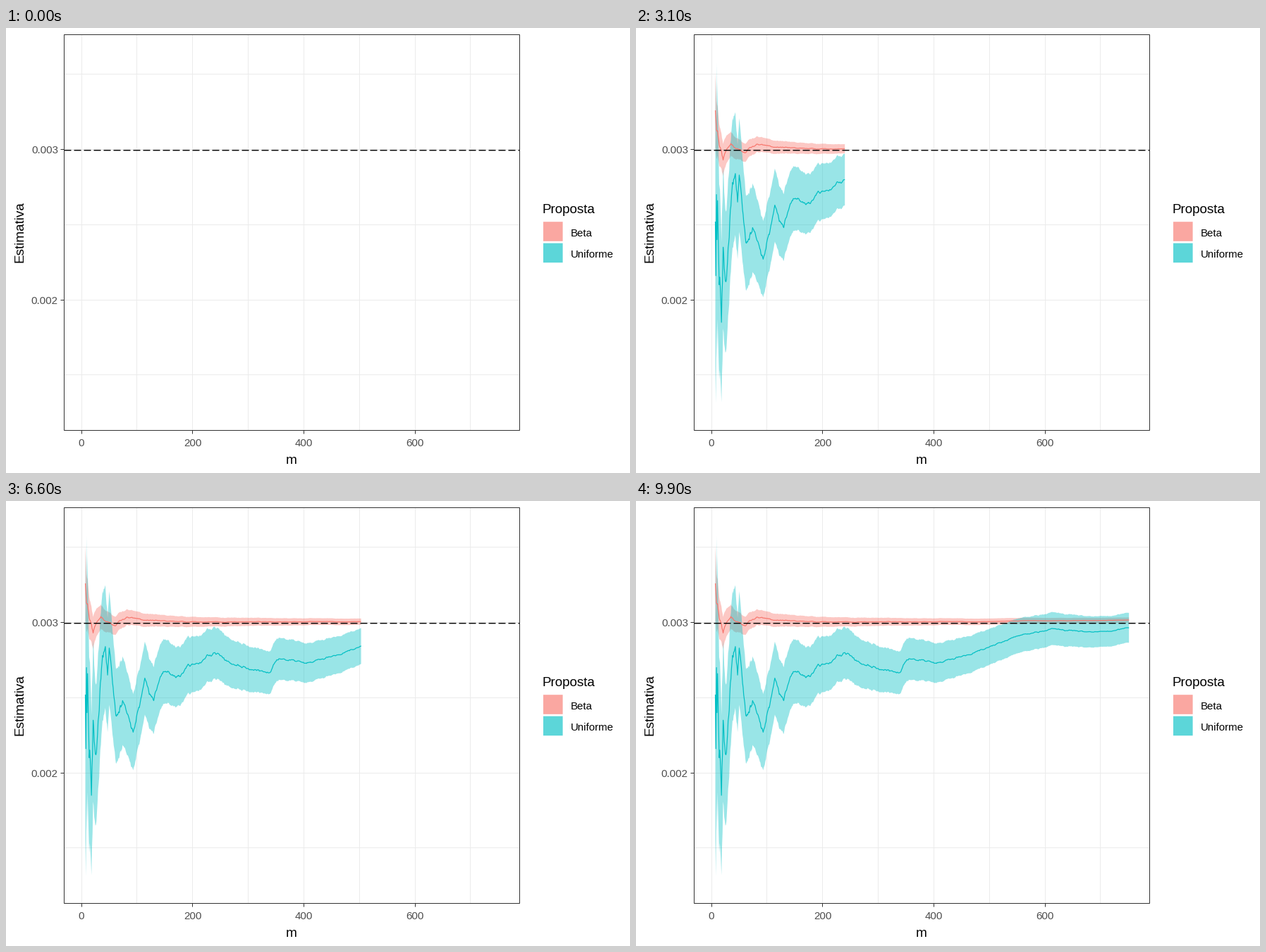
Recreate the animation shown at these times as a matplotlib script. Size 885 by 632 pixels, loop 10 s.

```python
import numpy as np
import matplotlib.pyplot as plt
from matplotlib.animation import FuncAnimation
from matplotlib.patches import Polygon, Rectangle

W, H, DPI = 885, 632, 64
PT = 72 / DPI  # points per pixel
FRAMES, INTERVAL = 100, 100
LEFT, RIGHT, TOP, BOTTOM = 82.5, 728.5, 9.5, 571.5
M0, M1 = 7, 751
CORAL, TEAL = "#F8766D", "#00BFC4"
GRID, EDGE, LABEL = "#EBEBEB", "#333333", "#4D4D4D"

plt.rcParams["font.family"] = "Liberation Sans"


def px(m):
    return 107 + 0.7885 * m


def py(v):
    """Pixel row of an estimate given in thousandths."""
    return 172.5 + 213.5 * (3 - v)


def crisp(v):
    return np.floor(v) + 0.5


fig = plt.figure(figsize=(W / DPI, H / DPI), dpi=DPI, facecolor="white")
ax = fig.add_axes([0, 0, 1, 1])
ax.set(xlim=(0, W), ylim=(H, 0))
ax.axis("off")


def line(xs, ys, color, z, width=1, **kw):
    return ax.plot(xs, ys, color=color, lw=width * PT, zorder=z, snap=False,
                   solid_capstyle="butt", dash_capstyle="butt", **kw)[0]


def text(x, y, s, size=15, color="black", **kw):
    ax.text(x, y, s, fontsize=size * PT, color=color, va="baseline", **kw)


def box(x, y, w, h, **kw):
    ax.add_patch(Rectangle((x, y), w, h, snap=False, **kw))


# Panel, grid and axes
for v in np.arange(1.5, 3.6, 0.5):
    line([LEFT, RIGHT], [crisp(py(v))] * 2, GRID, 1)
for v in range(0, 701, 100):
    line([crisp(px(v))] * 2, [TOP, BOTTOM], GRID, 1)
for v in (2, 3):
    line([LEFT - 5, LEFT], [crisp(py(v))] * 2, EDGE, 6)
    text(73.8, py(v) + 5.8, f"0.00{v}", color=LABEL, ha="right")
for v in range(0, 601, 200):
    line([crisp(px(v))] * 2, [BOTTOM, BOTTOM + 5], EDGE, 6)
    text(px(v), 593.7, str(v), color=LABEL, ha="center")
line([LEFT, RIGHT], [173.7] * 2, "black", 5, width=1.4,
     dashes=(10 / 1.4, 4 / 1.4))
box(LEFT, TOP, RIGHT - LEFT, BOTTOM - TOP, fill=False, ec=EDGE, lw=PT, zorder=6)

# Titles and legend
text(404.5, 619, "m", 19, ha="center")
text(25, 289.8, "Estimativa", 19, rotation=90, rotation_mode="anchor",
     ha="center")
text(760.5, 263.3, "Proposta", 18.9)
for y, name, color in ((275.2, "Beta", CORAL), (305.6, "Uniforme", TEAL)):
    box(762, y, 27.6, 27.6, fc=color, alpha=0.64, lw=0)
    text(800.5, y + 20.5, name)

# Running means: turning points (m, thousandths) joined by pinned random walks
rng = np.random.default_rng(12)
m = np.arange(M0, M1 + 1)
teal_turns = [(7, 2.52), (8, 2.16), (9, 2.70), (10, 2.40), (11, 2.66),
              (14, 2.10), (18, 1.85), (21, 2.35), (26, 2.12), (38, 2.78),
              (43, 2.84), (47, 2.65), (50, 2.83), (62, 2.38), (74, 2.48),
              (93, 2.27), (114, 2.63), (130, 2.48), (144, 2.65), (178, 2.64),
              (240, 2.80), (288, 2.70), (340, 2.67), (351, 2.75), (400, 2.73),
              (485, 2.82), (551, 2.91), (613, 2.96), (697, 2.94), (751, 2.965)]
coral_turns = [(7, 3.26), (9, 3.13), (14, 3.03), (21, 2.93), (35, 3.04),
               (62, 2.98), (81, 3.035), (125, 3.015), (340, 3.005), (751, 3.016)]


def running_mean(turns, spread):
    tm, tv = np.array(turns).T
    walk = np.cumsum(rng.normal(size=m.size) * spread / m)
    pinned = walk - np.interp(m, tm, np.interp(tm, m, walk))
    return np.interp(m, tm, tv) + pinned


class Series:
    def __init__(self, mean, half, color):
        self.mean, self.half = mean, half
        self.band = ax.add_patch(Polygon(np.zeros((3, 2)), fc=color, lw=0,
                                         alpha=0.4, zorder=3))
        self.curve = line([], [], color, 4, width=1.2)

    def reveal(self, end):
        ms = np.append(m[m < end], end)
        mid, half = np.interp(ms, m, self.mean), np.interp(ms, m, self.half)
        x, low, high = px(ms), py(mid - half), py(mid + half)
        self.curve.set_data(x, py(mid))
        self.band.set_xy(np.column_stack([np.append(x, x[::-1]),
                                          np.append(low, high[::-1])]))
        return self.band, self.curve


coral = running_mean(coral_turns, 0.15)
teal = running_mean(teal_turns, 0.8)
series = [Series(coral, 0.468 * (1 + 20 / m**2) / np.sqrt(m), CORAL),
          Series(teal, 2.646 * (teal / 2.763) ** 0.4 / np.sqrt(m), TEAL)]


def update(i):
    end = M0 + (M1 - M0) * i / (FRAMES - 1)
    return [artist for s in series for artist in s.reveal(end)]


anim = FuncAnimation(fig, update, frames=FRAMES, interval=INTERVAL,
                     repeat=True, repeat_delay=0, blit=False)
plt.show()
```
